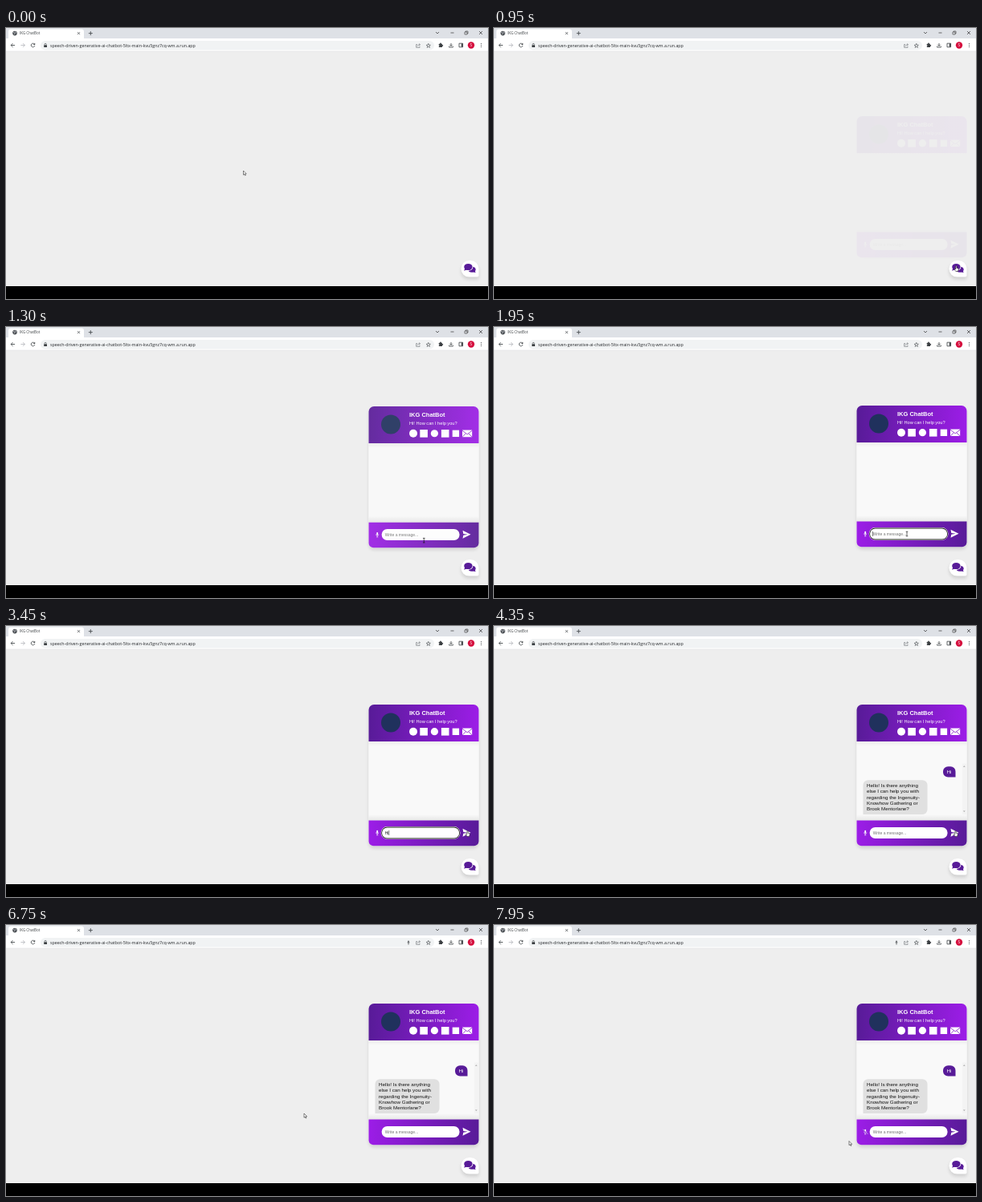
Animation of 600x338 px, one loop 8 s. Source, as an HTML page with a canvas:

```html
<!DOCTYPE html>
<html lang="en">
<head>
<meta charset="utf-8">
<title>Chat widget demo</title>
<style>
  html, body { margin: 0; width: 100%; height: 100%; overflow: hidden; background: #000; }
  canvas { display: block; width: 600px; height: 338px; }
</style>
</head>
<body>
<canvas id="stage"></canvas>
<script>
const W = 600, H = 338, LOOP = 8000;
const DPR = window.devicePixelRatio || 1;
const DARK = '#581b98', LIGHT = '#9c1de7', INK = '#3c4043';
const ARIAL = '"Liberation Sans", Arial, sans-serif';
const UI = '"Open Sans", "Noto Sans", sans-serif';

const OPEN_AT = 890, OPEN_MS = 500, FOCUS_AT = 1800, TYPE_AT = [2950, 3100];
const SEND_AT = 3600, REPLY_AT = 4000, MIC_AT = 5400, SLASH_AT = 7100;

const REPLY = ['Hello! Is there anything', 'else I can help you with', 'regarding the Ingenuity-',
  'Knowhow Gathering or', 'Brook Mentorlane?'];

// time, x, y of the pointer
const ROUTE = [
  [50, 295.5, 178], [760, 577, 299], [930, 577, 299], [1140, 520.5, 266.5], [1250, 520.5, 266.5],
  [1700, 514, 258], [2750, 514, 258], [3350, 574.5, 257], [4450, 574.5, 257],
  [5250, 462.5, 257], [5550, 462.5, 257], [6500, 371, 235], [7000, 371, 235], [7800, 442, 269.5]
];

function prepare(canvas) {
  canvas.width = W * DPR;
  canvas.height = H * DPR;
  const c = canvas.getContext('2d');
  c.scale(DPR, DPR);
  return c;
}

const stage = document.getElementById('stage');
const layer = document.createElement('canvas');
const screen = prepare(stage), widget = prepare(layer);
let g = screen;

function box(x, y, w, h, r, fill) {
  g.beginPath();
  g.roundRect(x, y, w, h, r);
  g.fillStyle = fill;
  g.fill();
}

function disc(x, y, r, fill) {
  g.beginPath();
  g.arc(x, y, r, 0, 7);
  g.fillStyle = fill;
  g.fill();
}

function text(s, x, y, size, fill, family = ARIAL, weight = 400) {
  g.font = `${weight} ${size}px ${family}`;
  g.fillStyle = fill;
  g.fillText(s, x, y);
}

// Path centred on x, y; stroked when a line width is given
function icon(x, y, d, color, line) {
  const p = new Path2D(d);
  g.save();
  g.translate(x, y);
  if (line) {
    g.strokeStyle = color;
    g.lineWidth = line;
    g.stroke(p);
  } else {
    g.fillStyle = color;
    g.fill(p);
  }
  g.restore();
}

function fade(x0, y0, x1, y1, from, to) {
  const f = g.createLinearGradient(x0, y0, x1, y1);
  f.addColorStop(0, from);
  f.addColorStop(1, to);
  return f;
}

function shadow(y, blur, alpha) {
  g.shadowColor = `rgba(0,0,0,${alpha})`;
  g.shadowOffsetY = y * DPR;
  g.shadowBlur = blur * DPR;
}

const smooth = u => u * u * (3 - 2 * u);
const clamp = u => Math.max(0, Math.min(1, u));

function micShape(x, y, s, color) {
  box(x - .85 * s, y - 3 * s, 1.7 * s, 3.6 * s, .85 * s, color);
  icon(x, y, `M${-1.6 * s} ${-.5 * s}A${1.6 * s} ${1.8 * s} 0 0 0 ${1.6 * s} ${-.5 * s}M0 ${1.3 * s}V${2.8 * s}M${-s} ${2.8 * s}H${s}`, color, .55 * s);
}

function drawBrowser(t) {
  box(0, 0, W, H, 0, '#eeeeee');
  box(0, 0, W, 13, 0, '#dee1e6');
  box(3, 1.5, 94, 12, [3, 3, 0, 0], '#fff');
  box(0, 13, W, 16, 0, '#fff');
  box(0, 28.7, W, .5, 0, '#dadce0');
  box(0, 322, W, 16, 0, '#000');

  disc(11, 6.6, 2.8, '#4d5156');
  icon(11, 6.6, 'M-2 -1.2L-.4 -.8L.2 .4L-1 1.4M.6 -2.2L1.2 -.8L2.3 -.4', '#e8eaed', .6);
  text('IKG ChatBot', 17, 8.3, 4.5, INK, UI);
  icon(90.5, 6.6, 'M-1.5 -1.5L1.5 1.5M1.5 -1.5L-1.5 1.5', INK, .7);
  icon(105.3, 6.6, 'M-2.5 0H2.5M0 -2.5V2.5', INK, .8);

  icon(537, 6, 'M-2 -1L0 1L2 -1', '#333', .7);
  icon(555.5, 6, 'M-2 0H2', '#333', .7);
  icon(573, 6, 'M-2 -1H1V2H-2ZM-1 -1V-2H2V1H1', '#333', .6);
  icon(591, 6, 'M-2 -2L2 2M2 -2L-2 2', '#333', .7);

  const back = 'M2.6 0H-2.4M0 -2.4L-2.4 0L0 2.4';
  icon(8.5, 21.5, back, INK, .8);
  icon(21, 21.5, 'M-2.6 0H2.4M0 -2.4L2.4 0L0 2.4', '#b4b7bb', .8);
  icon(33.5, 21.5, 'M1.8 -1.5A2.3 2.3 0 1 0 2.3 .5', INK, .8);
  icon(33.5, 21.5, 'M2.7 -2.8V-.4H.3Z', INK);

  box(43, 16, 490, 11.4, 5.7, '#f1f3f4');
  box(47.2, 21.2, 3.8, 2.9, .5, INK);
  icon(49.1, 21.2, 'M-1.1 0V-.8A1.1 1.1 0 0 1 1.1 -.8V0', INK, .6);
  text('speech-driven-generative-ai-chatbot-5ltx-main-kvu5gnz7cq-wm.a.run.app', 55, 23.7, 5.3, '#27292c', UI);
  if (t >= MIC_AT) micShape(501, 21.8, .8, INK);
  icon(513, 22, 'M-1 -1.5H-2.3V2.3H2V1M-.9 .7C-.6 -.6 .4 -1.2 2.4 -1.2M1.1 -2.5L2.5 -1.2L1.1 .1', '#5f6368', .6);
  icon(525.8, 22, 'M0 -2.6L.7 -.8L2.6 -.7L1.1 .5L1.6 2.4L0 1.3L-1.6 2.4L-1.1 .5L-2.6 -.7L-.7 -.8Z', INK, .6);
  box(538.8, 19.7, 4.2, 4.2, .5, INK);
  disc(541, 19.5, .9, INK);
  disc(543.3, 21.8, .9, INK);
  disc(538.8, 22, .7, '#fff');
  icon(554, 21.5, 'M0 -2.6V1M-1.7 -.7L0 1L1.7 -.7M-2.4 1.2V2.5H2.4V1.2', INK, .8);
  icon(566.3, 21.5, 'M-2.3 -2.3H2.3V2.3H-2.3Z', INK, .8);
  box(566.8, 19.4, 1.8, 4.2, 0, INK);
  disc(579, 21.5, 4.2, '#d5103f');
  text('S', 577.6, 23.3, 4.8, '#fff', UI);
  for (const d of [-2, 0, 2]) disc(591.5, 21.5 + d, .55, INK);
}

function drawLauncher() {
  g.save();
  shadow(3, 4.7, .13);
  box(566.5, 290, 22, 20.6, [10, 10, 2, 10], '#fff');
  g.restore();
  const bubble = (x, y, rx, ry, side, color) => {
    g.beginPath();
    g.ellipse(x, y, rx, ry, 0, 0, 7);
    g.fillStyle = color;
    g.fill();
    icon(x + side * rx, y + ry, `M0 .6L${-side * 1.2} -3L${-side * 4} -.8Z`, color);
  };
  bubble(580, 301.2, 4.6, 3.5, 1, DARK);
  bubble(575.4, 298, 6, 4.9, -1, '#fff');
  bubble(575.4, 298, 5.2, 4.1, -1, DARK);
}

function drawHeader() {
  box(451.5, 98, 137, 46, [6.5, 6.5, 0, 0], fade(451.5, 118, 588.5, 124, DARK, LIGHT));
  disc(479, 120.5, 12, '#20315d');
  text('IKG ChatBot', 502, 111.1, 7.5, '#fff', ARIAL, 700);
  text('Hi! How can I help you?', 502, 120.8, 5.65, '#fff');
  disc(507, 131.7, 5, '#fff');
  box(515.3, 127, 9.6, 9.6, 0, '#fff');
  disc(533.4, 131.7, 4.6, '#fff');
  box(541.9, 127, 9.6, 9.6, 0, '#fff');
  box(555.7, 127.6, 8.4, 8.4, 0, '#fff');
  box(568, 127.5, 12.2, 8.6, .5, '#fff');
  icon(574.1, 131.8, 'M-6 -3.6L0 1L6 -3.6M-5.8 4L-1.7 0M5.8 4L1.7 0', '#8419c8', .8);
}

function drawMessages(t) {
  box(451.5, 144, 137, 99, 0, '#f9f9f9');
  box(451.5, 144, 137, 6, 0, fade(0, 144, 0, 150, 'rgba(0,0,0,.05)', 'rgba(0,0,0,0)'));
  if (t >= REPLY_AT) {
    box(559, 175.2, 15.5, 13.4, [6.2, 6.2, 0, 6.2], DARK);
    text('Hi', 563.6, 184.1, 6.25, '#fff');
    box(459.5, 192.2, 80, 42.8, [6.2, 6.2, 6.2, 0], '#e0e0e0');
    REPLY.forEach((s, i) => text(s, 464, 201.2 + i * 7.2, 6.25, '#111'));
    box(582.8, 171.5, 5, 63.5, 0, '#f3f3f3');
    icon(585.3, 175, 'M-1.4 .8L0 -.8L1.4 .8Z', '#a3a3a3');
    icon(585.3, 231.2, 'M-1.4 -.8L0 .8L1.4 -.8Z', '#a3a3a3');
  }
  box(451.5, 235, 137, 8, 0, fade(0, 235, 0, 243, 'rgba(0,0,0,0)', 'rgba(0,0,0,.08)'));
}

function drawInput(t) {
  const focused = t >= FOCUS_AT && t < SEND_AT;
  const typed = t < REPLY_AT ? TYPE_AT.filter(at => t >= at).length : 0;
  if (focused) {
    box(466.7, 250.1, 98.8, 15.8, 7.9, '#fff');
    box(467.2, 250.6, 97.8, 14.8, 7.4, '#161616');
    box(468, 251.4, 96.2, 13.2, 6.6, '#fff');
  } else {
    box(467.6, 251, 97, 14, 7, '#fff');
  }
  if (typed) text('Hi'.slice(0, typed), 471.7, 259.9, 5, '#111');
  else text('Write a message...', 471.7, 259.9, 5, '#757575');

  const since = [FOCUS_AT, ...TYPE_AT].filter(at => t >= at).pop();
  if (focused && (t - since) % 1000 < 500) {
    box([471.3, 475.4, 476.6][typed], 255.1, .5, 5.9, 0, '#000');
  }
}

function drawFooter(t) {
  box(451.5, 242.6, 137, 31.6, [0, 0, 6, 6], fade(451.5, 256, 588.5, 260, LIGHT, DARK));
  if (t < MIC_AT || t >= SLASH_AT) micShape(462.2, 258, 1.05, '#fff');
  if (t >= SLASH_AT) {
    icon(462.2, 258, 'M-3 -2.8L3 3', '#8a1fd6', 1.4);
    icon(462.2, 258, 'M-2.8 -3.2L3.2 2.8', '#fff', .6);
  }
  drawInput(t);
  icon(573.3, 257.8, 'M-4.8 -5L5.2 0L-4.8 5L-4 .9L1.5 0L-4 -.9Z', '#fff');
}

function drawWidget(t) {
  const p = smooth(clamp((t - OPEN_AT) / OPEN_MS));
  if (!p) return;
  g = widget;
  g.clearRect(0, 0, W, H);
  g.save();
  g.translate(0, 12.5 * (1 - p));
  g.save();
  shadow(3, 4.7, .12);
  box(451.5, 98, 137, 176.2, 6.5, '#f9f9f9');
  g.restore();
  drawMessages(t);
  drawHeader();
  drawFooter(t);
  g.restore();
  g = screen;
  g.globalAlpha = p;
  g.drawImage(layer, 0, 0, W, H);
  g.globalAlpha = 1;
}

function pointerAt(t) {
  const i = ROUTE.findIndex(k => k[0] > t);
  if (i === 0) return ROUTE[0].slice(1);
  if (i < 0) return ROUTE[ROUTE.length - 1].slice(1);
  const [t0, x0, y0] = ROUTE[i - 1], [t1, x1, y1] = ROUTE[i];
  const u = smooth((t - t0) / (t1 - t0));
  return [x0 + (x1 - x0) * u, y0 + (y1 - y0) * u];
}

function drawPointer(t) {
  const [x, y] = pointerAt(t);
  const inRow = t > OPEN_AT && y > 250 && y < (t < 1400 ? 272 : 266);
  const onLauncher = x > 567 && y > 290;
  const onButton = inRow && (x > 567 || (x > 459 && x < 465.5));
  if (onLauncher || onButton) {
    const hand = 'M-.6 -.4V-1.2Q0 -2 .6 -1.2V1.2L2.4 1.7Q3 2 2.8 3L2.2 5.4H-.6L-2.2 3Q-2.2 2 -1.2 2.4L-.6 2.8Z';
    icon(x, y, hand, '#fff');
    icon(x, y, hand, '#111', .55);
  } else if (inRow && x >= 465.5) {
    icon(x, y, 'M-1.3 -2.8H1.3M0 -2.8V2.8M-1.3 2.8H1.3', '#111', .65);
  } else {
    const arrow = 'M0 0V5.2L1.2 4.1L2 6L2.9 5.6L2.1 3.8H3.7Z';
    icon(x, y, arrow, '#fff');
    icon(x, y, arrow, '#222', .55);
  }
}

function frame(now) {
  const t = now % LOOP;
  drawBrowser(t);
  drawLauncher();
  drawWidget(t);
  drawPointer(t);
  requestAnimationFrame(frame);
}
requestAnimationFrame(frame);
</script>
</body>
</html>
```
